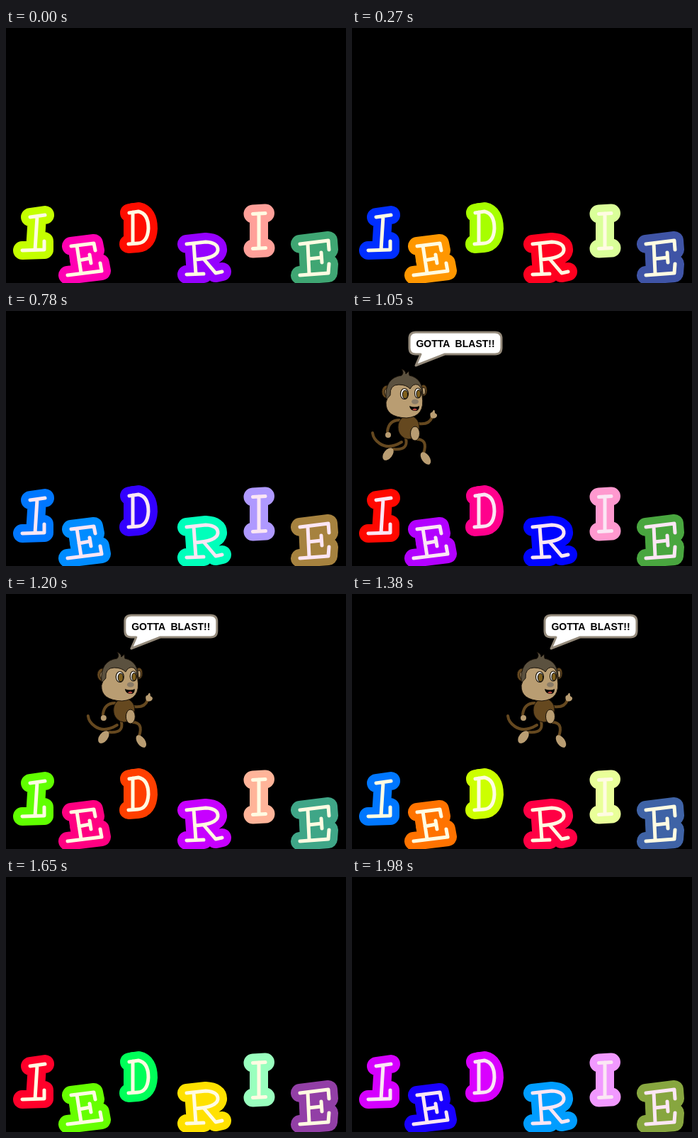
These frames come from a looping animation (480 by 360 pixels, 2010 ms). An HTML page:

```html
<!DOCTYPE html>
<html lang="en">
<head>
<meta charset="utf-8">
<title>Dancing name</title>
<style>
  html, body { margin: 0; width: 100%; height: 100%; overflow: hidden; background: #000; }
  svg { display: block; width: 480px; height: 360px; }
  #letters path { fill: none; stroke-linecap: round; stroke-linejoin: round; }
  .halo { stroke-width: 26; }
  .ink { stroke-width: 5; }
  .fur { fill: #65481f; }
  .skin { fill: #b99d72; }
  .limb { fill: none; stroke: #65481f; stroke-width: 4; stroke-linecap: round; }
  .line { stroke: #171008; stroke-width: 1; }
  .balloon { fill: #fff; stroke: #93897a; stroke-width: 3; stroke-linejoin: round; }
  text { font: bold 14px "Liberation Sans", Arial, sans-serif; text-anchor: middle; white-space: pre; }
</style>
</head>
<body>
<svg viewBox="0 0 480 360">
  <rect width="480" height="360"/>
  <g id="letters" role="img" aria-label="LEDRIE"></g>

  <g id="runner" visibility="hidden">
    <!-- tail, limbs, feet -->
    <path class="limb" d="M70 185Q52 196 39 187Q30 181 29 172"/>
    <path class="limb" d="M67 154Q52 154 50 170"/>
    <path class="limb" d="M94 159Q109 161 113 150"/>
    <path class="limb" d="M76 180Q80 197 59 195"/>
    <path class="limb" d="M90 181Q108 180 101 201"/>
    <circle class="skin" cx="51" cy="175" r="4"/>
    <path class="skin" d="M111 150Q109 143 113 143L115 140Q117 139 117 144Q122 146 119 150Q115 153 111 150Z"/>
    <ellipse class="skin" cx="51" cy="202" rx="6" ry="10" transform="rotate(38 51 202)"/>
    <ellipse class="skin" cx="104" cy="208" rx="5.5" ry="10" transform="rotate(-35 104 208)"/>
    <!-- body -->
    <ellipse class="fur line" cx="80" cy="164" rx="15" ry="17"/>
    <ellipse class="skin line" cx="89" cy="173" rx="6.5" ry="10"/>
    <!-- head -->
    <g class="line">
      <ellipse class="fur" cx="49" cy="114" rx="7" ry="9"/>
      <ellipse class="skin" cx="50" cy="115" rx="4" ry="6"/>
      <ellipse class="fur" cx="101" cy="112" rx="5" ry="8"/>
      <ellipse class="skin" cx="101" cy="113" rx="2.5" ry="5"/>
      <path fill="#5b513f" d="M48 124Q46 94 70 91Q74 87 70 82Q76 84 76 89L80 85L81 91Q101 95 100 121Z"/>
      <path class="skin" d="M54 119Q53 104 66 104Q77 104 82 110Q86 102 93 104Q99 107 99 120Q104 149 77 151Q47 150 48 129Q49 123 54 119Z"/>
    </g>
    <g stroke="#1a140a" stroke-width="1.2">
      <ellipse fill="#fff" cx="74" cy="117" rx="5.5" ry="7.5"/>
      <ellipse fill="#fff" cx="93" cy="116" rx="4.5" ry="7"/>
      <ellipse fill="#80601c" cx="75" cy="118" rx="3.6" ry="5.8"/>
      <ellipse fill="#80601c" cx="94" cy="117" rx="3" ry="5.3"/>
    </g>
    <ellipse fill="#897b67" cx="89" cy="128" rx="5" ry="3.5"/>
    <path d="M81 134Q89 137 95 134Q95 142 88 141Q82 140 81 134Z"/>
    <path fill="#b5483f" d="M85 139Q89 136 92 139Q89 142 85 139Z"/>

    <path id="balloon" class="balloon" d="M90 30H202Q211 30 211 39V52Q211 61 202 61H131L90 77L97 61H90Q81 61 81 52V39Q81 30 90 30Z"/>
    <text id="speech" x="146" y="51">GOTTA  BLAST!!</text>
  </g>
</svg>

<script>
  const STEP = 30, FRAMES = 67;
  const RUN_START = 31, RUN_END = 55, FLIP = 51, SPEED = 191 / 11;

  // step, colour wheel angle
  const wheel = [[0, 222], [16, 360], [26, 471], [35, 546], [46, 651], [55, 720], [66, 870]];

  const letters = [
    { hue: 350, rate: 2, tone: "100% 50%", d: "M34 267L55 264M44 266L41 313M23 314L54 313L54 301" },
    { hue: 96, tone: "100% 50%", d: "M92 308L124 304L126 314M100 307L106 346M103 328L119 325M118 320L120 332M87 349L135 343L133 332" },
    { hue: 141, tone: "100% 50%", d: "M174 261L187 259Q201 262 201 283Q200 303 186 304L173 305M179 260V304" },
    { hue: 53, tone: "100% 50%", d: "M255 305L282 302Q300 303 299 314Q297 325 267 327M265 304L268 347M255 348L279 347M279 326L296 346L305 344" },
    { hue: 142, tone: "100% 80%", d: "M348.5 262.5L366 261.5M357 262V311M348.5 311.5L366.5 310.5" },
    { hue: 288, tone: "45% 45%", d: "M415 305L455 300L456 313M426 304L428 347M427 326L445 324M445 317L446 331M415 349L455 346L456 333" }
  ];

  const byId = id => document.getElementById(id);
  const runner = byId("runner"), balloon = byId("balloon"), speech = byId("speech");

  function addPath(cls, d) {
    const path = document.createElementNS("http://www.w3.org/2000/svg", "path");
    path.setAttribute("class", cls);
    path.setAttribute("d", d);
    return byId("letters").appendChild(path);
  }

  for (const letter of letters) {
    letter.halo = addPath("halo", letter.d);
    letter.ink = addPath("ink", letter.d);
  }

  function angleAt(n) {
    const i = Math.max(1, wheel.findIndex(([step]) => step >= n));
    const [n0, a0] = wheel[i - 1], [n1, a1] = wheel[i];
    return a0 + (a1 - a0) * (n - n0) / (n1 - n0);
  }

  function draw(n) {
    const angle = angleAt(n), turn = angle % 360;
    const ink = turn > 60 && turn < 200 ? "#fbe6f4" : "#fffbe2";
    for (const { hue, rate = 1, tone, halo, ink: line } of letters) {
      halo.style.stroke = `hsl(${(hue + rate * angle) % 360} ${tone})`;
      line.style.stroke = ink;
    }

    const running = n >= RUN_START && n < RUN_END;
    runner.setAttribute("visibility", running ? "visible" : "hidden");
    runner.setAttribute("transform", `translate(${(n - 35) * SPEED} 0)`);
    // the balloon swaps sides near the right edge
    const flipped = n >= FLIP;
    balloon.setAttribute("transform", flipped ? "matrix(-1 0 0 1 148 0)" : "");
    speech.setAttribute("x", flipped ? 2 : 146);
  }

  const start = performance.now();
  function tick() {
    draw(Math.floor((performance.now() - start) / STEP) % FRAMES);
    requestAnimationFrame(tick);
  }
  tick();
</script>
</body>
</html>
```
